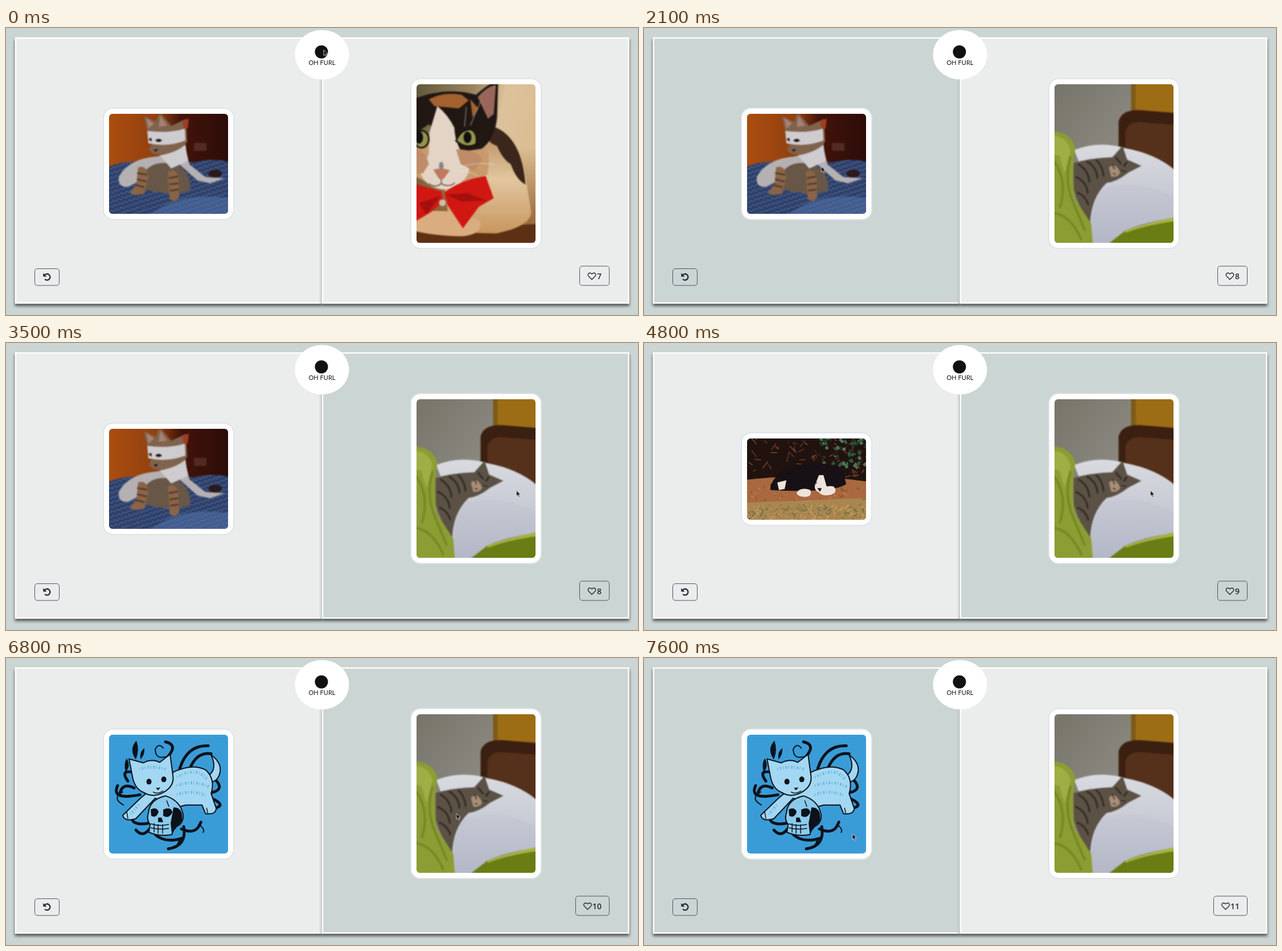
Recreate the animation shown at these times as an HTML page. Size 1110x505 px, loop 8 s.

```html
<!DOCTYPE html>
<html lang="en">
<head>
<meta charset="utf-8">
<title>Cat vote</title>
<style>
  html, body { margin: 0; width: 100%; height: 100%; overflow: hidden; background: #cbd5d3; }
  .stage { position: absolute; left: 0; top: 0; width: 1110px; height: 505px; }
  .card {
    position: absolute; left: 170px; padding: 9px; line-height: 0;
    background: #fff; border: 2px solid #e0e3e6; border-radius: 18px;
  }
  .card.right { left: 709.5px; }
  .card svg { width: 209.3px; border-radius: 6px; }
  .soft { filter: blur(.9px); }

  .panel { fill: #ebeded; stroke: #fff; stroke-width: 2.4; filter: drop-shadow(0 4px 2.5px rgba(0, 0, 0, .6)); }
  .button { fill: none; stroke: #4b5563; }
  .count { font: 600 14px "Open Sans", "Noto Sans", sans-serif; text-anchor: end; fill: #1f2937; }
  .brand { font: 11px Lato, sans-serif; text-anchor: middle; fill: #111; }

  .anim { animation: 8s step-end infinite; }
  #panelL { animation-name: hoverL; }
  #panelR { animation-name: hoverR; }
  #masked { animation-name: masked; }
  #garden { animation-name: garden; }
  #print  { animation-name: print; }
  #bow    { animation-name: bow; }
  #pillow { animation-name: pillow; }
  #n7 { animation-name: n7; }
  #n8 { animation-name: n8; }
  #n9 { animation-name: n9; }
  #n10 { animation-name: n10; }
  #n11 { animation-name: n11; }
  #likeBox { animation-name: widen; }
  #heart { animation-name: shift; }
  #cursor { animation-name: cursor; }

  @keyframes hoverL { 0%, 42.5% { fill: #ebeded } 6.25%, 86.25%, to { fill: #cbd5d3 } }
  @keyframes hoverR { 0%, 86.25%, to { fill: #ebeded } 42.5% { fill: #cbd5d3 } }
  @keyframes masked { 0% { opacity: 1 } 60%, to { opacity: 0 } }
  @keyframes garden { 0%, 80%, to { opacity: 0 } 60% { opacity: 1 } }
  @keyframes print  { 0% { opacity: 0 } 80%, to { opacity: 1 } }
  @keyframes bow    { 0% { opacity: 1 } 26.25%, to { opacity: 0 } }
  @keyframes pillow { 0% { opacity: 0 } 26.25%, to { opacity: 1 } }
  @keyframes n7  { 0% { opacity: 1 } 20%, to { opacity: 0 } }
  @keyframes n8  { 0%, 53.75%, to { opacity: 0 } 20% { opacity: 1 } }
  @keyframes n9  { 0%, 72.5%, to { opacity: 0 } 53.75% { opacity: 1 } }
  @keyframes n10 { 0%, 95%, to { opacity: 0 } 72.5% { opacity: 1 } }
  @keyframes n11 { 0% { opacity: 0 } 95%, to { opacity: 1 } }
  @keyframes widen { 0% { x: 1007.5px; width: 52px } 72.5%, to { x: 1000.5px; width: 59px } }
  @keyframes shift { 0% { transform: none } 72.5%, to { transform: translateX(-7.5px) } }
  @keyframes cursor {
    0%     { transform: translate(558px, 38.5px) }
    5%     { transform: translate(550px, 74px) }
    6.25%  { transform: translate(527.5px, 120.5px) }
    7.5%   { transform: translate(475px, 164px) }
    8.75%  { transform: translate(418px, 199px) }
    10%    { transform: translate(370px, 223px) }
    11.25% { transform: translate(336px, 236px) }
    12.5%  { transform: translate(318px, 242px) }
    13.75% { transform: translate(311.5px, 243.5px) }
    37.5%  { transform: translate(380px, 313px) }
    42.5%  { transform: translate(670px, 283px) }
    43.75% { transform: translate(896.5px, 259.5px) }
    45%    { transform: translate(892px, 259.5px) }
    46.25% { transform: translate(889.5px, 259.5px) }
    85%    { transform: translate(791px, 273.5px) }
    86.25% { transform: translate(480px, 300px) }
    87.5%, to { transform: translate(366px, 309.5px) }
  }
</style>
</head>
<body>
<svg class="stage" viewBox="0 0 1110 505">
  <rect id="panelL" class="panel anim" x="16.8" y="17.5" width="537" height="466.5"/>
  <rect id="panelR" class="panel anim" x="556" y="17.5" width="537.5" height="466.5"/>
</svg>

<div id="masked" class="card anim" style="top:140.3px">
  <svg viewBox="181 151 209 175">
    <linearGradient id="wall">
      <stop stop-color="#ab4d10"/><stop offset=".42" stop-color="#8f3f0f"/>
      <stop offset=".6" stop-color="#43130a"/><stop offset="1" stop-color="#2c0c08"/>
    </linearGradient>
    <pattern id="weave" width="9" height="8" patternUnits="userSpaceOnUse" patternTransform="rotate(-18)">
      <path d="M0 6L4.5 2 9 6" fill="none" stroke="#7486aa" stroke-width="1.3"/>
    </pattern>
    <path fill="url(#wall)" d="M181 151h209v175H181z"/>
    <g class="soft">
      <path fill="#6b4640" d="M330 202h22v14h-22z" opacity=".5"/>
      <path fill="#2a3d68" d="M176 246Q205 232 240 236H330Q365 228 395 236V331H176z"/>
      <path fill="url(#weave)" opacity=".65" d="M176 246Q205 232 240 236H330Q365 228 395 236V331H176z"/>
      <path fill="#5276ac" opacity=".55" d="M250 331Q305 285 395 300V331z"/>
      <path fill="#b5b1b3" d="M265 226Q215 230 198 262 196 281 215 279L250 260 300 236 336 268 358 273 384 264 350 262 322 240 316 215z"/>
      <path fill="#685646" d="M244 252Q262 230 300 241 326 255 323 285 290 297 245 284z"/>
      <path fill="#8a6446" d="M232 245Q248 240 250 262L243 291Q228 296 217 290L229 275zM284 252Q299 246 303 262L304 298Q295 309 287 300z"/>
      <path stroke="#493628" stroke-width="2.5" fill="none" d="M230 255l18 3M230 266l17 4M227 276l16 4M286 264l16-3M287 275l16-2M288 286l15-2"/>
      <path fill="#7f634d" d="M248 182L242 155 264 165Q266 151 272 151L290 172 316 160 318 200Q305 222 280 222 255 226 251 213L259 200z"/>
      <path fill="#a88171" d="M246 158l14 10-10 9zM271 154l12 18-15 2z"/>
      <path fill="#a23c20" d="M309 165l12-6-2 17-6 4z"/>
      <path fill="#cfccd0" d="M248 181Q285 186 314 177L315 198Q285 210 250 203zM270 224Q300 219 315 205L319 234 290 247z"/>
      <path fill="#201512" d="M262 198q6-6 12 0-6 5-12 0zM250 196l5-3 1 7zM259 214l8-1-4 5z"/>
      <ellipse cx="367" cy="256" rx="12" ry="7" fill="#2a1a1c"/>
    </g>
  </svg>
</div>

<div id="garden" class="card anim" style="top:156.5px">
  <svg viewBox="181 167.5 209 143">
    <path fill="#20130f" d="M181 167h209v144H181z"/>
    <g id="twigs"></g>
    <path fill="#a9683f" d="M181 240Q285 228 390 243V311H181z"/>
    <path fill="#a98650" d="M181 280Q285 276 390 272V311H181z"/>
    <g id="grass"></g>
    <path fill="#171115" d="M222 250Q240 212 285 213L291 209 300 214Q325 206 348 222L355 248Q330 264 222 258z"/>
    <path fill="#eee3da" d="M307 232L315 232 320 250Q326 262 310 263 298 260 300 250zM234 245l16-4-3 15-10 2z"/>
    <path fill="#eee3da" d="M268 262q8-10 24-4 4 12-10 12-14-1-14-8zM307 262q10-14 26-10 8 10-4 14-16 4-22-4z"/>
    <path fill="#171115" d="M304 255l8 0-3 6zM296 242l9 4-8 1zM319 245l9-3-5 5z"/>
  </svg>
</div>

<div id="print" class="card anim" style="top:123.5px">
  <svg viewBox="181 134.5 209 209.3">
    <path fill="#3a9cd7" d="M181 134h209v210H181z"/>
    <g fill="none" stroke="#0b121b" stroke-width="5" stroke-linecap="round">
      <path d="M238 205Q196 190 214 216M235 240Q184 250 196 224M225 228Q204 218 200 238M285 172Q302 152 280 147M305 194Q318 152 355 154M322 196Q334 164 360 168M364 210Q386 230 362 236M360 246Q388 258 366 264"/>
      <path d="M250 290Q215 296 222 272M252 300Q240 316 228 302M285 335Q318 330 312 296M308 300Q334 312 342 288M262 310Q280 326 310 316"/>
      <path stroke-width="2" d="M285 172Q262 180 262 160 268 148 276 158M205 235Q185 246 206 258M338 292Q350 300 346 306"/>
    </g>
    <path fill="#0b121b" d="M228 178Q215 160 229 145 235 162 228 178zM236 178Q234 164 243 158 244 170 236 178zM210 200Q206 185 212 176 220 190 210 200zM284 338q16-4 20-22 10 14-20 22z"/>
    <g fill="#a4d7f2" stroke="#0b121b" stroke-width="2" stroke-linejoin="round">
      <path d="M354 207Q372 196 360 170 382 186 374 206 370 216 360 218z"/>
      <path d="M290 202Q325 184 350 196 368 212 360 238L369 264Q368 276 350 273L344 258 316 258 300 262Q280 266 277 252L262 246 228 282Q208 288 205 276L236 246z"/>
      <path d="M222 208L216 177 241 184Q256 176 270 183L288 169 293 206Q296 225 276 236 258 246 242 236 226 230 222 208z"/>
      <path fill="#8bcaec" d="M250 272Q252 248 280 242 306 250 311 275 312 292 296 297L291 310Q270 314 251 306L253 292Q246 284 250 272z"/>
    </g>
    <g fill="#0b121b">
      <path d="M254 266q10-6 14 4-4 12-13 7zM276 266q14-6 16 5-6 12-16 6zM267 280l6 0 3 8-9 0zM294 262q18 0 15 24-12 14-18 22l-2-18z"/>
      <ellipse cx="251" cy="217" rx="4.5" ry="5"/><ellipse cx="277" cy="213" rx="4.5" ry="5"/>
      <path d="M263 228l8-1-4 5z"/>
    </g>
    <path fill="none" stroke="#0b121b" stroke-width="1.5" d="M254 291q16 5 32 1M254 298q16 4 32 1M260 290v16M267 292v16M275 292v16M258 235q8 5 18-2M212 270l2 12M282 250l4 11M352 263l2 9"/>
    <path fill="none" stroke="#5bb1df" stroke-width="5" stroke-dasharray="1 4 2 3" d="M300 209Q335 190 352 212M300 224Q330 213 356 226M300 240Q325 230 352 242M233 258l-14 16M234 195q20-7 46 0"/>
  </svg>
</div>

<div id="bow" class="card right anim" style="top:88.4px">
  <svg viewBox="720.5 99.4 209.3 279">
    <linearGradient id="cream" x2="1" y2=".3">
      <stop stop-color="#5f583b"/><stop offset=".45" stop-color="#9d8560"/>
      <stop offset=".7" stop-color="#dcc29c"/><stop offset="1" stop-color="#dbbd91"/>
    </linearGradient>
    <linearGradient id="shade" x2="0" y2="1">
      <stop offset=".4" stop-color="#8a5426" stop-opacity="0"/><stop offset="1" stop-color="#8a5426"/>
    </linearGradient>
    <linearGradient id="fur" x2="0" y2="1">
      <stop stop-color="#b28355"/><stop offset=".5" stop-color="#e2c79f"/><stop offset="1" stop-color="#c8965f"/>
    </linearGradient>
    <path fill="url(#cream)" d="M720 99h210v280H720z"/>
    <path fill="url(#shade)" d="M720 99h210v280H720z"/>
    <g class="soft">
      <path fill="#5d3014" d="M715 358L935 345V385H715z"/>
      <path fill="url(#fur)" d="M845 170Q905 190 913 270L922 325Q920 350 860 362L780 360 770 280z"/>
      <path fill="#3b261c" d="M856 174Q905 192 912 276 896 268 886 240 872 232 862 208 850 204 846 196z"/>
      <path fill="#d9ad7f" d="M715 325Q790 315 832 340 838 364 800 367 750 366 715 357z"/>
      <path fill="#c99a6c" d="M715 190H775L840 205Q852 225 845 258L800 285H765L715 260z"/>
      <path fill="#201713" d="M715 125Q775 103 825 118 850 95 864 94L862 158Q858 196 835 213L800 218 770 190 742 170 715 188z"/>
      <path fill="#99675a" d="M828 122Q846 102 860 101L856 152 846 160z"/>
      <path fill="#a3622e" d="M742 126Q768 112 800 118L812 128 795 142 752 138zM815 126l14 16-10 16z"/>
      <path fill="#e3d4c6" d="M757 138Q775 152 787 176 788 205 806 228 822 252 801 270 784 287 763 284 738 280 728 258L742 222 743 185z"/>
      <path fill="#be8c68" d="M715 212Q736 214 742 240L732 256 715 256zM790 214Q828 214 836 232L822 252 798 240z"/>
      <g stroke="#1b130e" stroke-width="3" fill="#96944f">
        <path d="M790 199Q798 178 817 179 829 186 825 205 807 214 790 199z"/>
        <ellipse cx="729" cy="196" rx="13" ry="15"/>
      </g>
      <ellipse cx="810" cy="193" rx="7" ry="10" fill="#11100c"/><ellipse cx="725" cy="193" rx="7" ry="11" fill="#11100c"/>
      <path fill="#c0785f" d="M750 250Q764 245 779 251L768 266 760 266z"/>
      <ellipse cx="764" cy="243" rx="4" ry="7" fill="#8c8284"/>
      <path fill="none" stroke="#644134" stroke-width="1.5" d="M764 265v9q-10 9-22 0M764 274q12 8 24-1"/>
      <path fill="none" stroke="#f0e4d9" stroke-width=".7" d="M796 252q30 0 52 25M796 245q35-10 62-4M815 172l18-42M805 174l3-35"/>
      <path fill="#d01712" d="M715 274L764 288 768 305 745 325 715 343zM769 290Q800 267 842 261L856 300 830 315 802 353 775 312z"/>
      <path fill="#a50f0d" d="M773 294L810 291 843 304 800 306zM724 309L762 296 738 328z"/>
      <circle cx="766" cy="308" r="6" fill="#d0bda9"/>
    </g>
  </svg>
</div>

<div id="pillow" class="card right anim" style="top:88.4px">
  <svg viewBox="720.5 99.4 209.3 279">
    <linearGradient id="plaster" x2="1" y2="1"><stop stop-color="#77756a"/><stop offset="1" stop-color="#a09e97"/></linearGradient>
    <linearGradient id="linen" x2="0" y2="1"><stop stop-color="#d9dbe0"/><stop offset="1" stop-color="#b5b9c8"/></linearGradient>
    <pattern id="mesh" width="4" height="4" patternUnits="userSpaceOnUse"><circle cx="2" cy="2" r=".8" fill="#8f96aa"/></pattern>
    <path fill="url(#plaster)" d="M720 99h210v280H720z"/>
    <g class="soft">
      <path fill="#7d5a17" d="M855 94H935V152H855z"/><path fill="#9c6d14" d="M863 94H935V152H863z"/>
      <path fill="#3b1f10" d="M833 225V165Q838 144 870 145L935 150V270z"/>
      <path fill="#55301a" d="M845 212V182Q850 166 870 166L935 171V255z"/>
      <path fill="url(#linen)" d="M755 215Q800 198 845 212 900 222 935 253V335Q880 340 845 357L815 384H790Q775 350 790 305z"/>
      <path fill="url(#mesh)" opacity=".65" d="M800 285Q860 260 935 300V335Q880 340 845 357L815 384H790Q778 340 800 285z"/>
      <path fill="#697d14" d="M845 357Q890 342 935 333V384H810z"/>
      <path fill="#a9b33f" d="M845 357Q890 342 935 333V340Q880 347 845 361z"/>
      <path fill="#5b5145" d="M754 238Q785 229 822 228L840 208 848 232 873 243 850 255Q830 271 812 273 784 300 783 345 765 320 754 285z"/>
      <path fill="none" stroke="#302a24" stroke-width="3" d="M762 240q18 10 20 32M777 235q18 10 19 30M793 232q12 10 14 30M757 262q20 8 22 30M760 290q15 5 20 22M828 228l10 12M848 236l-6 8"/>
      <path fill="#a78e76" d="M816 246Q828 235 836 255 832 264 820 262z"/>
      <path fill="none" stroke="#2d241d" stroke-width="1.5" d="M822 240l4 9M837 251l9 2M823 256l5 2"/>
      <path fill="#8c9d33" d="M715 182Q752 184 757 213 750 250 756 300L785 345 788 384H715z"/>
      <path fill="#a0ae45" d="M715 190Q742 190 749 216L738 256 729 225 715 222z"/>
      <path fill="none" stroke="#68791e" stroke-width="4" opacity=".6" d="M720 235q24 35 10 82M749 226q-13 42 5 83l20 48M720 326q30 5 48 48"/>
    </g>
  </svg>
</div>

<svg class="stage" viewBox="0 0 1110 505">
  <ellipse cx="555" cy="47" rx="47.5" ry="43.5" fill="#fff"/>
  <circle cx="554" cy="42" r="11.5" fill="#111"/>
  <text class="brand" x="555" y="65">OH FURL</text>

  <rect class="button" x="50.5" y="423.5" width="43" height="29.5" rx="4.5"/>
  <path d="M67.5 435.200A5.4 5.4 0 1 1 68.2 442" fill="none" stroke="#1f2937" stroke-width="2.3"/>
  <path d="M65.3 431.3v6.3h6.3z" fill="#1f2937"/>

  <rect id="likeBox" class="button anim" x="1007.5" y="419" width="52" height="34" rx="4.5"/>
  <path id="heart" class="anim" fill="none" stroke="#1f2937" stroke-width="1.4" stroke-linejoin="round"
    d="M1029 442.5L1023.500 437C1020.500 433.5 1024 428.5 1029 432.800C1034 428.5 1037.500 433.5 1034.500 437z"/>
  <g class="count">
    <text id="n7" class="anim" x="1046" y="441.5">7</text>
    <text id="n8" class="anim" x="1046" y="441.5">8</text>
    <text id="n9" class="anim" x="1046" y="441.5">9</text>
    <text id="n10" class="anim" x="1046" y="441.5">10</text>
    <text id="n11" class="anim" x="1046" y="441.5">11</text>
  </g>
  <path id="cursor" class="anim" d="M0 0v10l2.3-2.1 1.7 3.9 1.7-.8-1.7-3.7h3.2z" fill="#111" stroke="#fff" stroke-width=".7"/>
</svg>

<script>
  let seed = 7;
  const random = () => (seed = seed * 16807 % 2147483647) / 2147483647;
  const between = (a, b) => a + (b - a) * random();

  // Scatters short strokes over a box [x0, y0, x1, y1].
  function scatter(id, count, [x0, y0, x1, y1], length, width, colors) {
    let marks = '';
    for (let i = 0; i < count; i++) {
      const x = between(x0, x1).toFixed(1), y = between(y0, y1).toFixed(1);
      const dx = between(-length, length).toFixed(1), dy = between(-length, 0).toFixed(1);
      marks += `<path d="M${x} ${y}l${dx} ${dy}" stroke="${colors[i % colors.length]}" stroke-width="${width}"/>`;
    }
    document.getElementById(id).innerHTML += marks;
  }

  scatter('twigs', 90, [181, 170, 390, 242], 12, 1.2, ['#7a3f28', '#4a2a1c', '#945236']);
  scatter('twigs', 55, [310, 168, 390, 222], 7, 5, ['#2f5540', '#1f3a2a', '#4f7658']);
  scatter('grass', 200, [181, 286, 390, 313], 7, 1.4, ['#d2a45f', '#5f6a48', '#c58d52', '#7c7846']);
  scatter('grass', 60, [181, 244, 390, 280], 5, 1.2, ['#c98a5c', '#7b4529']);
</script>
</body>
</html>
```
